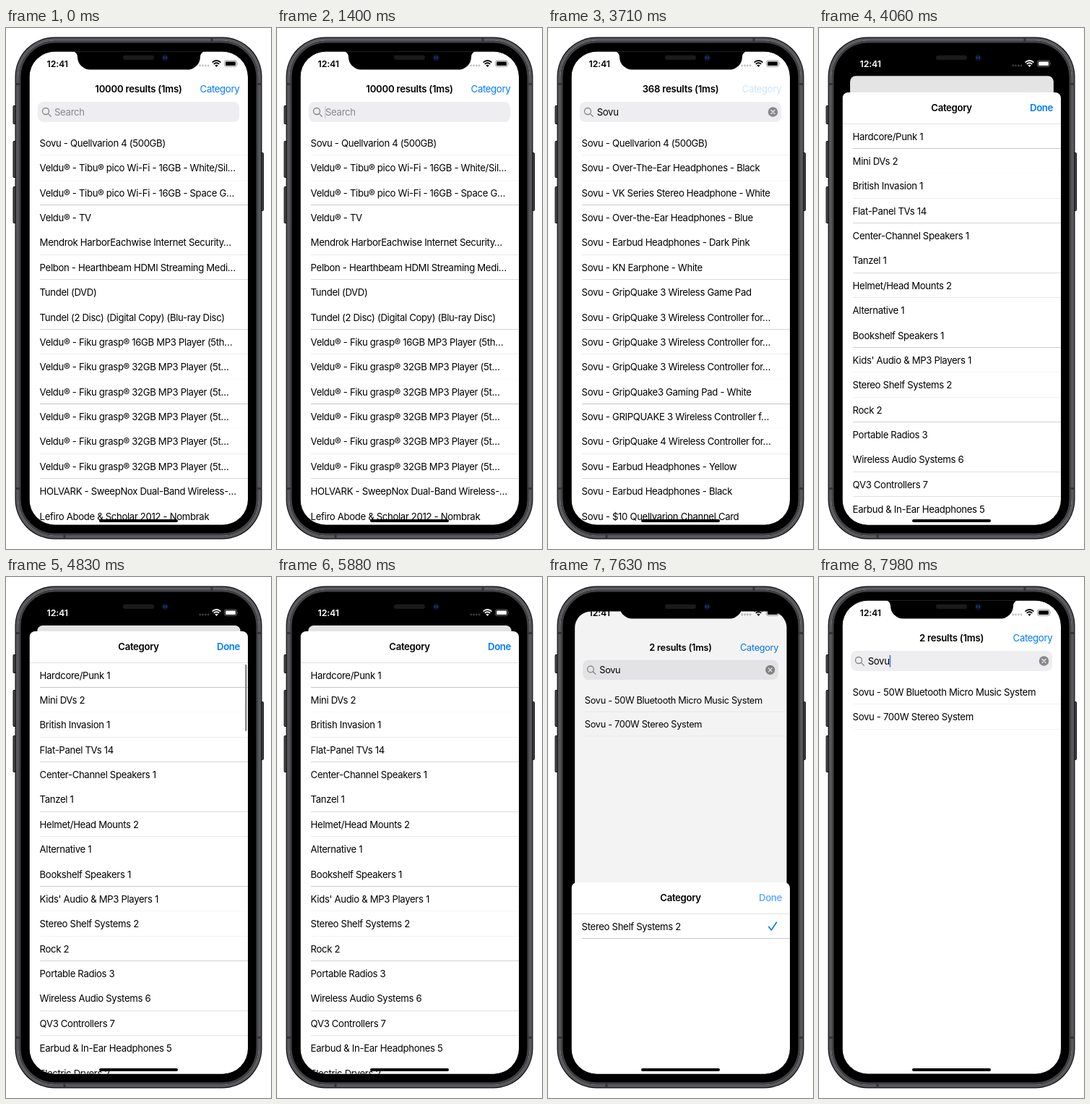
Animation, 367 px wide and 720 px high, one loop 8000 ms. Source, as an HTML page:

```html
<!DOCTYPE html>
<html lang="en">
<head>
<meta charset="utf-8">
<title>Product search</title>
<style>
  html, body { margin: 0; width: 100%; height: 100%; overflow: hidden; background: #fff; }
  svg { display: block; width: 367px; height: 720px; }
  text { font: 13.2px Inter, "Open Sans", sans-serif; letter-spacing: -.35px; white-space: pre; }
  .bold { font-weight: 600; }
  .mid { text-anchor: middle; }
  .link { fill: #007aff; text-anchor: end; }
  .line { fill: none; stroke-linecap: round; stroke-linejoin: round; }
</style>
</head>
<body>
<svg viewBox="0 0 367 720">
  <defs>
    <clipPath id="screen"><rect x="32.5" y="32.5" width="302.5" height="654" rx="35"/></clipPath>
  </defs>

  <!-- phone body -->
  <g fill="#4a4a4d" stroke="#0c0c0d">
    <rect x="10" y="107.5" width="6" height="25" rx="1"/>
    <rect x="10" y="156.5" width="6" height="50" rx="1"/>
    <rect x="10" y="219.5" width="6" height="50" rx="1"/>
    <rect x="351" y="172.5" width="5.5" height="80" rx="1"/>
  </g>
  <rect x="12.5" y="12.5" width="342" height="694" rx="55" fill="#0c0c0d"/>
  <g fill="none">
    <rect x="15.2" y="15.2" width="336.6" height="688.6" rx="52.3" stroke="#58595c" stroke-width="3"/>
    <rect x="17.2" y="17.2" width="332.6" height="684.6" rx="50.3" stroke="#727376" stroke-width="1.2"/>
    <rect x="19.2" y="19.2" width="328.6" height="680.6" rx="48.3" stroke="#414144" stroke-width="3"/>
  </g>
  <path d="M13.5 77.5h6M347.5 77.5h6M13.5 636.5h6M347.5 636.5h6M285 13.5v6M81 699.5v6" stroke="#353538" stroke-width="3"/>
  <rect x="20.7" y="20.7" width="325.6" height="677.6" rx="47"/>

  <g clip-path="url(#screen)">
    <rect x="32" y="32" width="304" height="656"/>
    <g id="main">
      <rect id="card" x="32.5" y="32.5" width="302.5" height="700" fill="#fff"/>
      <text id="count" class="bold mid" x="183.5" y="88.7" style="letter-spacing:-.25px"></text>
      <text id="category" class="link" x="323.3" y="88.7">Category</text>
      <rect x="44" y="102" width="279" height="28" rx="8" fill="#eeeef0"/>
      <g class="line" stroke="#85858a" stroke-width="1.3">
        <circle cx="55" cy="115" r="4.5"/><path d="M58.4 118.4l3.8 3.8"/>
      </g>
      <text id="hint" x="67" y="120.8" fill="#88888d">Search</text>
      <text id="query" x="67.7" y="120.8"></text>
      <rect id="cursor" y="108" width="1.6" height="16.5" fill="#3f6fdc"/>
      <g id="clear">
        <circle cx="311.5" cy="116" r="6.8" fill="#88888c"/>
        <path class="line" d="M309 113.5l5 5m0-5l-5 5" stroke="#eeeef0" stroke-width="1.2"/>
      </g>
      <g id="lists"></g>
      <rect id="dim" x="32" y="32" width="304" height="700" opacity="0"/>
    </g>
    <g id="sheet">
      <path d="M32.5 720V83a8 8 0 0 1 8-8H327a8 8 0 0 1 8 8V720z" fill="#fff"/>
      <text class="bold mid" x="183.5" y="101.2">Category</text>
      <text id="done" class="link bold" x="324" y="101.2">Done</text>
      <rect x="33" y="118" width="302" height="1" fill="#c6c6c8" opacity=".5"/>
      <g id="facets"></g>
      <path id="check" class="line" d="M305.8 136.5l3.6 4.4 7-10.6" stroke="#007aff" stroke-width="1.7"/>
      <rect id="scrollbar" x="331" y="121" width="2.6" height="92" rx="1.3" fill="#8b8b8d"/>
    </g>
    <path d="M91 32a8 8 0 0 1 8 8a17.5 17.5 0 0 0 17.5 17.5H251.5a17.5 17.5 0 0 0 17.5 -17.5a8 8 0 0 1 8 -8z"/>
    <g id="status">
      <text class="bold" x="56.5" y="53.7" style="font-size:12.4px;letter-spacing:-.1px">12:41</text>
      <g opacity=".24">
        <circle cx="268.7" cy="52" r="1.4"/><circle cx="272.5" cy="52" r="1.4"/>
        <circle cx="276.3" cy="52" r="1.4"/><circle cx="280.1" cy="52" r="1.4"/>
      </g>
      <path d="M285.6 47.6Q291.5 42.4 297.4 47.6M287.7 49.9Q291.5 46.6 295.3 49.9" fill="none" stroke="currentColor" stroke-width="1.7"/>
      <path d="M289.3 51.6Q291.5 49.8 293.7 51.6L291.5 53.9z"/>
      <rect x="302.5" y="45" width="17" height="8.4" rx="2.5" fill="none" stroke="currentColor" stroke-opacity=".45" stroke-width=".9"/>
      <rect x="304" y="46.4" width="14" height="5.6" rx="1.3"/>
      <path d="M320.7 47.8q1.4 1.4 0 2.8z" opacity=".5"/>
    </g>
    <rect x="129" y="679" width="109" height="4" rx="2"/>
  </g>
  <rect x="162" y="37.8" width="43" height="6.2" rx="3.1" fill="#1b1b1d"/>
  <circle cx="220.3" cy="41" r="4.6" fill="#0c1026"/>
  <path class="line" d="M218.8 39.7v2.4M222 39.7v2.4" stroke="#28479c" stroke-width="1.3"/>
</svg>

<script>
const LOOP = 8000, STEP = 70, ROW = 34.37;
const KEY_TIMES = [1540, 2100, 2590, 3150];
const FOCUS = 630, PRESS = 3500, OPEN = 3730, SELECT = 6510, DONE = 7490, CLOSE = 7520, CLOSED = 7840, REFOCUS = 7980;
const BRAND = "Sovu";
const COUNTS = [10000, 4028, 1303, 389, 368];

const player = size => `Veldu® - Fiku grasp® ${size}GB MP3 Player (5t`;
const allProducts = [
  BRAND + " - Quellvarion 4 (500GB)",
  "Veldu® - Tibu® pico Wi-Fi - 16GB - White/Sil…",
  "Veldu® - Tibu® pico Wi-Fi - 16GB - Space G…",
  "Veldu® - TV",
  "Mendrok HarborEachwise Internet Security…",
  "Pelbon - Hearthbeam HDMI Streaming Medi…",
  "Tundel (DVD)",
  "Tundel (2 Disc) (Digital Copy) (Blu-ray Disc)",
  player(16) + "h…",
  ...Array(5).fill(player(32) + "…"),
  "HOLVARK - SweepNox Dual-Band Wireless-…",
  "Lefiro Abode & Scholar 2012 - Nombrak"
];
const controller = "GripQuake 3 Wireless Controller for…";
const brandProducts = [
  "Quellvarion 4 (500GB)", "Over-The-Ear Headphones - Black",
  "VK Series Stereo Headphone - White", "Over-the-Ear Headphones - Blue",
  "Earbud Headphones - Dark Pink", "KN Earphone - White",
  "GripQuake 3 Wireless Game Pad", controller, controller, controller,
  "GripQuake3 Gaming Pad - White", "GRIPQUAKE 3 Wireless Controller f…",
  "GripQuake 4 Wireless Controller for…", "Earbud Headphones - Yellow",
  "Earbud Headphones - Black", "$10 Quellvarion Channel Card"
].map(withBrand);
const filteredProducts = ["50W Bluetooth Micro Music System", "700W Stereo System"].map(withBrand);
const facetNames = [
  "Hardcore/Punk 1", "Mini DVs 2", "British Invasion 1", "Flat-Panel TVs 14",
  "Center-Channel Speakers 1", "Tanzel 1", "Helmet/Head Mounts 2", "Alternative 1",
  "Bookshelf Speakers 1", "Kids' Audio & MP3 Players 1", "Stereo Shelf Systems 2",
  "Rock 2", "Portable Radios 3", "Wireless Audio Systems 6", "QV3 Controllers 7",
  "Earbud & In-Ear Headphones 5", "Electric Dryers 2"
];

function withBrand(name) { return `${BRAND} - ${name}`; }
const el = id => document.getElementById(id);
const ramp = (t, from, to) => Math.min(1, Math.max(0, (t - from) / (to - from)));
const show = (node, on) => node.setAttribute("display", on ? "inline" : "none");
const fade = (node, alpha) => node.setAttribute("opacity", alpha);

function add(parent, tag, attrs) {
  const node = document.createElementNS("http://www.w3.org/2000/svg", tag);
  for (const key in attrs) node.setAttribute(key, attrs[key]);
  return parent.appendChild(node);
}

// Hairlines vary in strength with the sub-pixel position they fall on.
function makeList(parent, names, baseline, firstLine) {
  const group = add(parent, "g", {});
  names.forEach((name, i) => {
    add(group, "text", { x: 46.6, y: baseline + i * ROW }).textContent = name;
    const y = firstLine + i * ROW;
    const strength = Math.max(0, 1 - Math.abs(y % 1 - .4) / .4);
    add(group, "rect", { x: 47, y: Math.floor(y), width: 288, height: 1, fill: "#c6c6c8", opacity: strength });
  });
  return group;
}

const lists = [allProducts, brandProducts, filteredProducts].map(n => makeList(el("lists"), n, 164, 175.7));
const facets = makeList(el("facets"), facetNames, 140.6, 152.4);
const chosen = makeList(el("facets"), ["Stereo Shelf Systems 2"], 140.6, 152.4);

// Critically damped spring from 0 to 1.
function spring(ms) {
  const x = Math.max(0, ms) * .0173;
  return 1 - (1 + x) * Math.exp(-x);
}

function sheetProgress(t) {
  if (t < DONE) return spring(t - OPEN);
  return t < CLOSED ? 1 - spring(t - CLOSE) : 0;
}

function cursorAlpha(t) {
  if (t >= REFOCUS) return 1;
  if (t < KEY_TIMES[0]) return ramp(t, FOCUS - STEP, FOCUS + 2 * STEP) * (1 - ramp(t, 1190, 1470));
  return 1 - ramp(t, 3500, 3710);
}

function render(t) {
  const typed = KEY_TIMES.filter(key => t >= key).length;
  const selected = t >= SELECT;
  const active = selected ? 2 : typed ? 1 : 0;
  lists.forEach((list, i) => show(list, i === active));
  el("count").textContent = `${selected ? 2 : COUNTS[typed]} results (1ms)`;
  el("query").textContent = BRAND.slice(0, typed);
  show(el("hint"), !typed);
  show(el("clear"), typed);
  el("cursor").setAttribute("x", typed ? 67.7 + el("query").getComputedTextLength() : 66);
  fade(el("cursor"), cursorAlpha(t));
  fade(el("category"), t >= PRESS && t < DONE ? .2 : 1);

  const open = sheetProgress(t);
  const scale = 1 - .07 * open;
  el("main").setAttribute("transform",
    `translate(${32.5 + 10.8 * open} ${32.5 + 34.5 * open}) scale(${scale}) translate(-32.5 -32.5)`);
  el("card").setAttribute("rx", 35 - 27 * open);
  el("dim").setAttribute("rx", 35 - 27 * open);
  fade(el("dim"), .11 * open);

  show(el("sheet"), open > 0);
  el("sheet").setAttribute("transform", `translate(0 ${Math.round(612 * (1 - open))})`);
  show(facets, !selected);
  show(chosen, selected);
  show(el("check"), selected);
  fade(el("done"), t >= DONE ? .2 + .8 * ramp(t, DONE, DONE + 280) : 1);
  fade(el("scrollbar"), ramp(t, 4690, 4830) * (1 - ramp(t, 5460, 5880)));

  const ink = open > .5 ? "#fff" : "#000";
  el("status").setAttribute("fill", ink);
  el("status").setAttribute("color", ink);
}

const start = performance.now();
function tick() {
  const t = (performance.now() - start) % LOOP;
  render(Math.floor(t / STEP) * STEP);
  requestAnimationFrame(tick);
}
tick();
</script>
</body>
</html>
```
